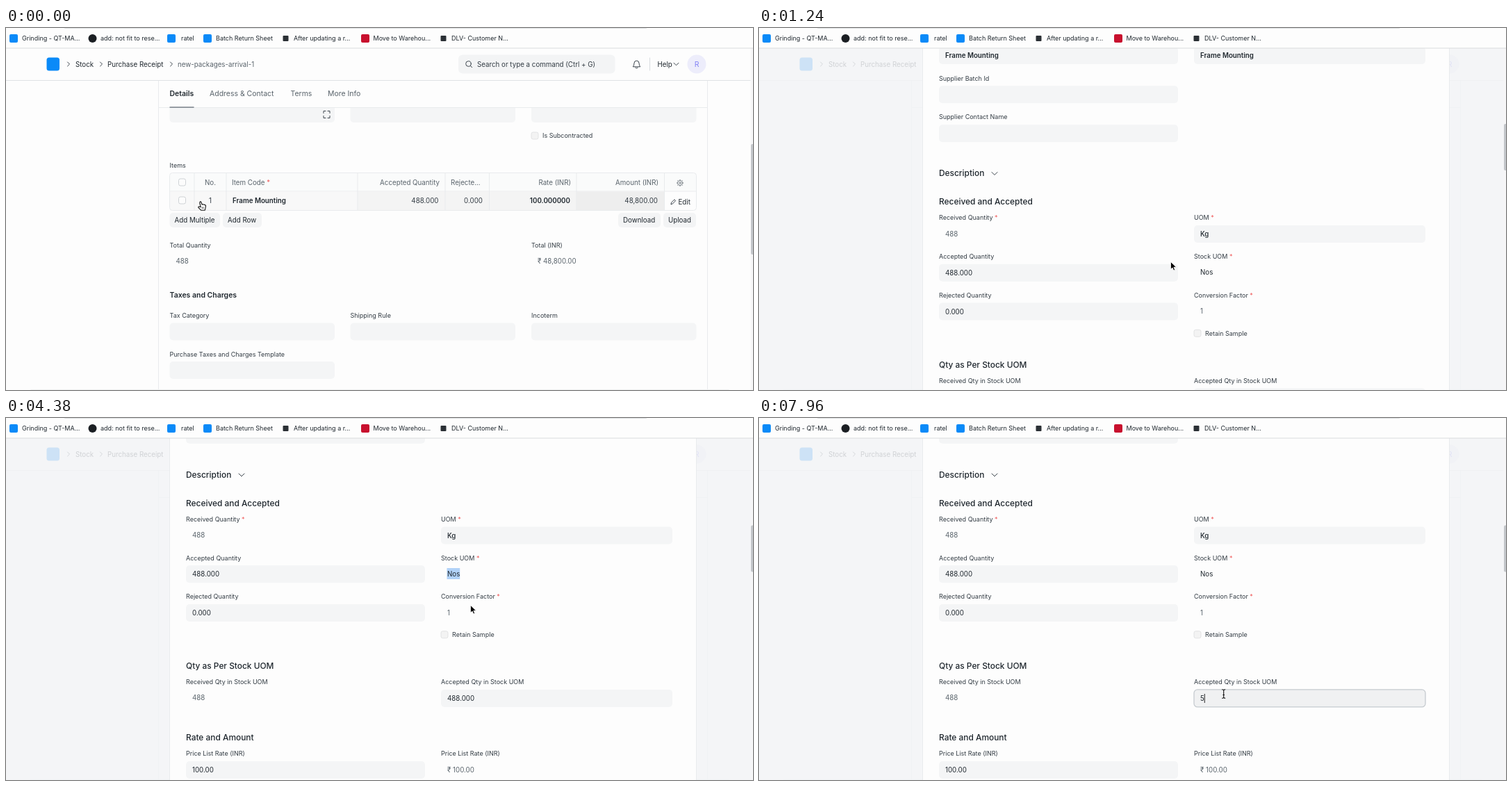
Animation, 1075 px wide and 521 px high, one loop 8 s. Source, as an HTML page:

```html
<!DOCTYPE html>
<html lang="en">
<head>
<meta charset="utf-8">
<title>Receipt form</title>
<style>
html, body { margin: 0; width: 100%; height: 100%; overflow: hidden; background: #fdfdfd; }
svg { display: block; width: 100vw; height: 100vh; }
text { font-family: Inter, "Noto Sans", "Liberation Sans", sans-serif; fill: #333c44; white-space: pre; }
.label { font-size: 9px; }
.body { font-size: 9.76px; }
.tab { font-size: 10.48px; }
.head { font-size: 11.92px; font-weight: 500; fill: #1f272e; }
.mid { font-weight: 500; }
.bold { font-weight: 600; fill: #1f272e; }
.soft { fill: #59636b; }
.dark { fill: #1f272e; }
.star { fill: #f06060; }
.end { text-anchor: end; }
.center { text-anchor: middle; }
.line { fill: none; stroke: #3c454d; stroke-width: 1; stroke-linecap: round; stroke-linejoin: round; }
.bare .box { visibility: hidden; }
</style>
</head>
<body>
<svg id="stage" viewBox="0 0 1075 521" preserveAspectRatio="none"></svg>
<script>
const FIELD = '#f4f5f6', EDGE = '#e9ebed', BLUE = '#0a8af8', PICK = '#b1d2f8';

// Drawing helpers; text is placed by the middle of its capitals.
const SIZE = { label: 9, body: 9.76, tab: 10.48, head: 11.92 };
const text = (x, mid, str, cls = 'body') =>
  `<text x="${x}" y="${mid + SIZE[cls.split(' ')[0]] * 0.36}" class="${cls}">${str}</text>`;
const rect = (x, y, w, h, fill, r = 0, extra = '') =>
  `<rect x="${x}" y="${y}" width="${w}" height="${h}" rx="${r}" fill="${fill}" ${extra}/>`;
const line = (d, extra = '') => `<path class="line" d="${d}" ${extra}/>`;
const rule = (d, color = EDGE) => line(d, `style="stroke:${color}"`);
const chevron = (x, y, w = 3.5) => line(`M${x - w} ${y - w / 2}l${w} ${w}l${w} ${-w}`);
const crumbArrow = x => line(`M${x - 1.5} 49l3 3l-3 3`, 'stroke-width="1.2"');
const check = (x, y, fill = '#fcfcfc', edge = '#c3c8cc') =>
  rect(x, y, 10, 10, fill, 2.5, `stroke="${edge}" stroke-width=".8"`);
const checkOff = (x, y) => check(x, y, '#f3f3f3', '#dcdedf');
const group = (id, body) => `<g id="${id}">${body}</g>`;
const star = '<tspan class="star"> *</tspan>';

function bookmarks() {
  const square = (x, color) => rect(x, 9, 12, 12, color, 2);
  const small = (x, color) => rect(x + 0.5, 11, 8, 8, color, 1);
  const disc = (x, color) => `<circle cx="${x + 6.5}" cy="15" r="6" fill="${color}"/>`;
  const items = [
    [square, BLUE, 5, 23, 'Grinding - QT-MA...'], [disc, '#1b1f23', 118, 136, 'add: not fit to rese...'],
    [square, BLUE, 232, 252, 'ratel'], [square, BLUE, 284, 302, 'Batch Return Sheet'],
    [small, '#2b3035', 398, 414, 'After updating a r...'], [square, '#c8102e', 511, 528.5, 'Move to Warehou...'],
    [small, '#2b3035', 625, 641, 'DLV- Customer N...']
  ];
  return rect(0, 0, 1075, 29, '#fdfdfd') + rect(83, -4, 840, 5, '#dfe1e3', 3) +
    rule('M0 29H1075', '#dadcde') +
    items.map(([icon, color, ix, x, str]) => icon(ix, color) + text(x, 15, str, 'label dark')).join('');
}

function header() {
  return rect(0, 29, 1075, 46.5, '#fdfdfd') + rule('M0 75.5H1075', '#dfe2e5') +
    rect(58.5, 42.5, 18.5, 19, BLUE, 3.5) +
    crumbArrow(90) + text(100, 52, 'Stock', 'body dark') +
    crumbArrow(137) + text(146, 52, 'Purchase Receipt', 'body dark') +
    crumbArrow(238) + text(247, 52, 'new-packages-arrival-1', 'body soft') +
    rect(651, 38.5, 225.5, 27, '#f3f4f5', 6) +
    '<circle cx="665.5" cy="51.5" r="3.8" class="line"/>' + line('M668.3 54.3l2.4 2.4') +
    text(678, 52, 'Search or type a command (Ctrl + G)') +
    line('M902.5 55.5q1.4-1.4 1.4-4.5a3.6 3.9 0 0 1 7.2 0q0 3.1 1.4 4.5zM905.8 57.2q1.7 1.6 3.4 0') +
    rule('M926.5 43V61', '#d8dcdf') + text(937.5, 52, 'Help', 'body dark') + chevron(964.5, 52) +
    '<circle cx="994" cy="52" r="13.5" fill="#ededfb"/>' +
    '<text x="994" y="55.7" class="tab center" style="fill:#8484f5">R</text>';
}

function tabs() {
  return rect(220, 76, 789, 39, '#fdfdfd') + rule('M220 114.5H1009') +
    group('tabNames', text(235.5, 94, 'Details', 'tab bold') +
      text(293, 94, 'Address &amp; Contact', 'tab soft') +
      text(409.5, 94, 'Terms', 'tab soft') + text(463, 94, 'More Info', 'tab soft')) +
    rect(235.5, 113.5, 35, 1.1, '#4a5560', 0, 'id="underline"');
}

function gear(x, y) {
  let teeth = '';
  for (let a = 0; a < 2 * Math.PI - 0.1; a += Math.PI / 4) {
    const c = Math.cos(a), s = Math.sin(a);
    teeth += `M${x + 3.6 * c} ${y + 3.6 * s}L${x + 4.6 * c} ${y + 4.6 * s}`;
  }
  const ring = r => `<circle cx="${x}" cy="${y}" r="${r}" class="line" style="stroke-width:.8;stroke:#6b747c"/>`;
  return line(teeth, 'style="stroke:#6b747c"') + ring(3.6) + ring(1.4);
}

function tableHead() {
  const bars = [271, 317, 506, 632, 695.5, 821, 947.5].map(x => `M${x} 208.5V235`).join('');
  return rect(235.5, 208.5, 758, 26.5, '#fafbfb', 4) +
    rule('M235.5 235V212.5q0-4 4-4H989.5q4 0 4 4V235H235.5' + bars) +
    check(248.5, 217) + text(294, 222.5, 'No.', 'body soft center') +
    text(325, 222.5, 'Item Code' + star, 'body soft') +
    text(624, 222.5, 'Accepted Quantity', 'body soft end') + text(640, 222.5, 'Rejecte...', 'body soft') +
    text(813, 222.5, 'Rate (INR)', 'body soft end') + text(939, 222.5, 'Amount (INR)', 'body soft end') +
    gear(970, 223);
}

function tableRow() {
  const bars = [271, 317, 506, 632, 695.5, 821, 947.5].map(x => `M${x} 235V262`).join('');
  return rect(236, 235.5, 270, 27, '#f8f8f8') + rect(506, 235.5, 315, 27, '#f4f4f4') +
    rect(821, 235.5, 126.5, 27, '#eeeeee') +
    rule('M235.5 235V258.5q0 4 4 4H989.5q4 0 4-4V235' + bars) +
    check(248.5, 243) + text(294, 248, '1', 'body center') + text(326, 248, 'Frame Mounting', 'body bold') +
    text(622.5, 248, '488.000', 'body end') + text(686, 248, '0.000', 'body end') +
    text(812, 248, '100.000000', 'body bold end') + text(938, 248, '48,800.00', 'body end') +
    line('M957 253.5l.6-2.3l4.3-4.3l1.7 1.7l-4.3 4.3z') + text(967.5, 250, 'Edit', 'body dark');
}

const button = (x, w, y, str) => rect(x, y - 10.5, w, 21, '#f3f4f5', 5) + text(x + 7, y, str, 'body dark');

function pageRest() {
  const box = (x, y) => rect(x, y, 237.5, 25, FIELD, 5);
  return tableRow() + button(235.5, 72.5, 276.5, 'Add Multiple') + button(312, 56, 276.5, 'Add Row') +
    button(881, 61, 276.5, 'Download') + button(946, 47, 276.5, 'Upload') +
    text(235.5, 313, 'Total Quantity', 'label') + text(244.5, 335.5, '488', 'body soft') +
    text(756, 313, 'Total (INR)', 'label') + text(765, 335.5, '₹ 48,800.00', 'body soft') +
    text(235.5, 384.5, 'Taxes and Charges', 'tab bold') +
    text(235.5, 414, 'Tax Category', 'label') + text(495.5, 414, 'Shipping Rule', 'label') +
    text(756, 414, 'Incoterm', 'label') + [235.5, 495.5, 756].map(x => box(x, 424.5)).join('') +
    text(235.5, 469.5, 'Purchase Taxes and Charges Template', 'label') + box(235.5, 480);
}

function page() {
  return [235.5, 495.5, 756].map(x => rect(x, 100, 237.5, 36, FIELD, 5)).join('') +
    line('M457 122.5v-3h3M463 119.5h3v3M466 126.5v3h-3M460 129.5h-3v-3') +
    checkOff(756, 150) + text(772, 155, 'Is Subcontracted', 'label') +
    text(235.5, 197.5, 'Items', 'label') + tableHead() + group('rest', pageRest());
}

// One form control: label, optional grey box, value.
const LEFT = 259, RIGHT = 626;
function control(x, y, label, value = '', { box = true, cls = 'dark', id = '' } = {}) {
  const w = x === LEFT ? 344 : 333;
  return text(x, y, label, 'label') +
    (box ? rect(x, y + 11, w, 25, FIELD, 5, `class="box" stroke-width="1.3" ${id && `id="${id}Box"`}`) : '') +
    (id ? `<g id="${id}Extra"></g>` : '') +
    (value ? `<g ${id && `id="${id}Text"`}>${text(x + 9, y + (box ? 23.5 : 23), value, 'body ' + cls)}</g>` : '');
}

function form() {
  const fixed = { box: false, cls: 'soft' };
  const tools = [[667, 73, 'Insert Below'], [743.5, 74, 'Insert Above'], [822, 72, ''], [898.5, 40, 'Move'], [943, 27, '']];
  return rect(235.5, -143, 758, 1600, '#fdfdfd', 0, `stroke="${EDGE}"`) +
    '<text x="259" y="-111" class="bold" style="font-size:13.4px">Editing Row #1</text>' +
    rect(636, -128, 27, 22, '#ee7f7f', 5) +
    line('M645.5-120h9M648.5-120v-1.8h3v1.8M646.5-120l.5 8h6l.5-8M649-117.5v3M651-117.5v3', 'style="stroke:#fff;stroke-width:.9"') +
    tools.map(([x, w, str]) => rect(x, -127.5, w, 21, '#f7f8f8', 5, 'class="box"') + text(x + 7.5, -116.5, str)).join('') +
    line('M832.5-119h6v6h-6zM830.5-113.5v2.5h6M830.5-113.5v-3h2', 'style="stroke-width:.9"') +
    text(843.5, -116.5, 'Duplicate') + chevron(956.5, -116) +
    control(LEFT, -69, 'Barcode') +
    control(LEFT, 16, 'Item Code' + star, 'Frame Mounting', { cls: 'bold' }) +
    control(RIGHT, 16, 'Item Name' + star, 'Frame Mounting', { cls: 'bold' }) +
    control(LEFT, 72.3, 'Supplier Batch Id') + control(LEFT, 128.2, 'Supplier Contact Name') +
    text(LEFT, 209, 'Description', 'head') + chevron(339, 209.5, 4) +
    text(LEFT, 250.2, 'Received and Accepted', 'head') +
    control(LEFT, 273, 'Received Quantity' + star, '488', fixed) +
    control(RIGHT, 273, 'UOM' + star, 'Kg', { cls: 'mid dark', id: 'uom' }) +
    control(LEFT, 328.8, 'Accepted Quantity', '488.000') +
    control(RIGHT, 328.8, 'Stock UOM' + star, 'Nos', { box: false, id: 'nos' }) +
    control(LEFT, 384.5, 'Rejected Quantity', '0.000') +
    control(RIGHT, 384.5, 'Conversion Factor' + star, '1', fixed) +
    checkOff(626, 434.3) + text(642, 439.3, 'Retain Sample', 'label') +
    text(LEFT, 484.3, 'Qty as Per Stock UOM', 'head') +
    control(LEFT, 507.4, 'Received Qty in Stock UOM', '488', fixed) +
    control(RIGHT, 507.4, 'Accepted Qty in Stock UOM', '488.000', { id: 'qty' }) +
    text(LEFT, 587.7, 'Rate and Amount', 'head') +
    control(LEFT, 610.5, 'Price List Rate (INR)', '100.00') +
    control(RIGHT, 610.5, 'Price List Rate (INR)', '₹ 100.00', fixed);
}

const CURSORS = {
  arrow: '<path d="M0 0V10.8l2.5-2.3l1.7 4l1.9-.8l-1.7-3.9H8z" fill="#000" stroke="#fff" stroke-width=".8"/>',
  beam: '<path d="M-2.5-6.3Q0-6.3 0-4.8Q0-6.3 2.5-6.3M0-5V5M-2.5 6.3Q0 6.3 0 4.8Q0 6.3 2.5 6.3M-1.3 1.5H1.3" fill="none" stroke="#111" stroke-width="1.1"/>',
  hand: '<path d="M-1 .6Q-.2-.8.8.4L2.2 4.2Q3.3 3.3 4.2 4.2Q5.4 3.6 6 4.7Q7.3 4.4 7.5 6L7 9.2L6.2 12.3H.8L-3 8.6Q-3.6 7.2-2.2 7L.3 7.8L-1.2 2z" fill="#fff" stroke="#111" stroke-width="1.1" stroke-linejoin="round"/><path d="M2.3 7.5v2.5M4.1 7.5v2.5" stroke="#111" stroke-width=".7"/>'
};

document.getElementById('stage').innerHTML =
  rect(0, 0, 1075, 521, '#fdfdfd') + rule('M219.5 76V521M1009.5 76V521') + rule('M36 520.5H1040', '#f0f1f2') +
  group('page', page()) + tabs() + header() +
  rect(0, 29, 1075, 492, '#f2f4f6', 0, 'id="dim"') + group('form', form()) +
  rect(1071.5, 29, 4, 492, '#f6f6f7') + rect(1072, 0, 5, 67, '#c3c6ca', 2, 'id="thumb"') +
  bookmarks() + '<g id="cursor"></g>';

const $ = Object.fromEntries([...document.querySelectorAll('[id]')].map(el => [el.id, el]));

// Held steps: each entry stays until the next one's time.
const SCROLL = [[0, -372], [920, -270], [1070, -110], [1240, 0], [1540, 28], [1690, 66], [1840, 85.3],
  [4080, 97], [4230, 116], [4380, 127.5]];
const POINTER = [[0, 'hand', 280, 250], [480, 'arrow', 440, 295], [620, 'beam', 593, 337], [920, 'arrow', 592.5, 336.5],
  [1390, 'beam', 593, 337], [1690, 'arrow', 612, 306], [1840, 'arrow', 632, 272], [1980, 'arrow', 646.5, 242],
  [2130, 'arrow', 657, 224], [2280, 'beam', 662, 211], [2750, 'beam', 663, 213], [2900, 'arrow', 665, 232],
  [3030, 'arrow', 668, 255], [3180, 'arrow', 668.5, 269.5], [4520, 'arrow', 669, 315], [4670, 'hand', 670, 356.5],
  [4820, 'hand', 669.5, 380], [4960, 'beam', 668.7, 397]];
const FADE = [[0, 0], [480, 0.15], [620, 0.45], [770, 0.85], [920, 1]];
const DIM = [[0, 0], [770, 0.45], [920, 0.84]];
const held = (steps, t) => steps.findLast(s => s[0] <= t);
const move = (el, x, y) => el.setAttribute('transform', `translate(${x} ${y})`);

function ring(el, strength) {
  el.setAttribute('fill', strength ? '#f0f1f2' : FIELD);
  el.setAttribute('stroke', strength ? '#c6cbd0' : 'none');
  el.setAttribute('stroke-opacity', strength);
}

function put(el, html) {
  if (el.shown !== html) { el.innerHTML = html; el.shown = html; }
}

function draw(t) {
  const settled = t >= 150, open = t >= 480, scroll = held(SCROLL, t)[1];
  const [, kind, x, y] = held(POINTER, t);

  move($.tabNames, 0, settled ? -0.7 : 0);
  move($.underline, 0, settled ? -0.7 : 0);
  $.underline.setAttribute('fill', settled ? '#3d8fd6' : '#4a5560');
  move($.page, 0, open ? -378 - scroll : 0);
  $.rest.style.display = open ? 'none' : '';
  $.dim.setAttribute('opacity', held(DIM, t)[1]);
  $.form.setAttribute('opacity', held(FADE, t)[1]);
  $.form.classList.toggle('bare', t < 770);
  move($.form, 0, -scroll);
  $.thumb.setAttribute('y', open ? 90 + 0.129 * (scroll + 372) : 167);
  $.thumb.setAttribute('height', open ? 67 : 159);

  ring($.uomBox, t >= 2600 && t < 3480 ? 1 : 0);
  put($.uomExtra, t >= 2600 && t < 4080 ? line('M945.5 296.8h7.5M950.3 294l2.8 2.8l-2.8 2.8') : '');
  put($.nosExtra, t >= 3780 && t < 5260 ? rect(634.5, 343.5, 18.7, 16, PICK) : '');

  const typed = t >= 7960, editing = t >= 5260;
  ring($.qtyBox, t >= 5410 ? 1 : editing ? 0.6 : 0);
  put($.qtyExtra, typed ? rect(640.8, 524.5, 0.9, 13, '#111') : editing ? rect(635, 524.5, 18.3, 13, PICK) : '');
  put($.qtyText, text(635, 530.9, typed ? '5' : editing ? '488' : '488.000', 'body dark'));

  put($.cursor, CURSORS[kind]);
  move($.cursor, x, y);
}

function tick() {
  draw(performance.now() % 8000);
  requestAnimationFrame(tick);
}
tick();
</script>
</body>
</html>
```
